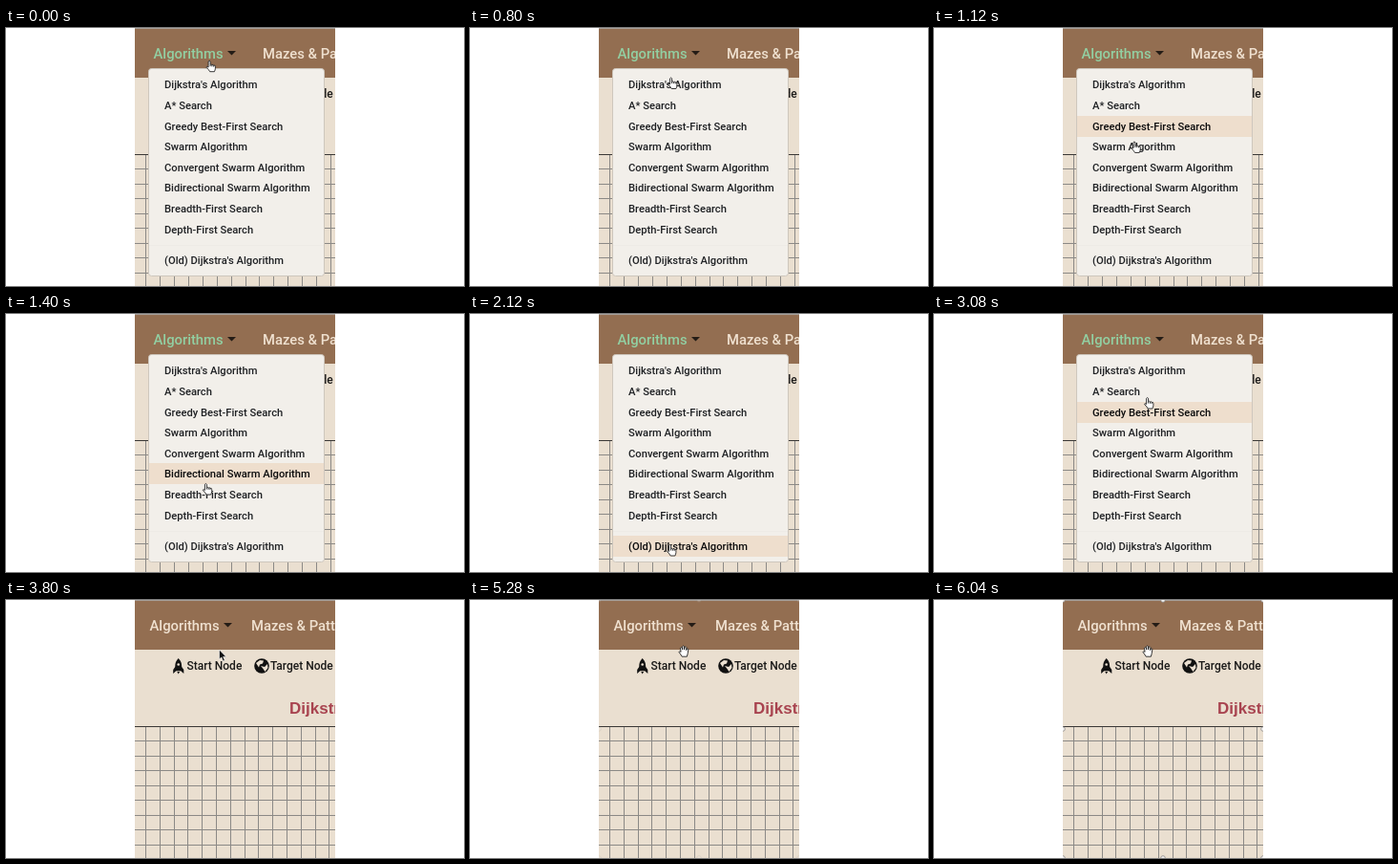
These frames come from a looping animation (480 by 270 pixels, 6.56 s). An HTML page:

```html
<!DOCTYPE html>
<html lang="en">
<head>
<meta charset="utf-8">
<title>Algorithm menu</title>
<style>
  html, body { margin: 0; width: 100%; height: 100%; overflow: hidden; background: #fff; }
  svg { display: block; width: 100vw; height: 100vh; }
  text { font: 500 11.2px Roboto, Lato, sans-serif; fill: #1f2124; }
  .nav text { font-size: 14.8px; fill: #efe0cf; }
  .nav .active { fill: #92cfa2; }
  .label text { font-size: 12px; fill: #1b1a19; }
  .title { font: bold 17px "Liberation Sans", Arial, sans-serif; fill: #a8434f; }
  .hand { fill: #fff; stroke: #222; stroke-width: .9; stroke-linejoin: round; }
</style>
</head>
<body>
<svg viewBox="0 0 480 270">
  <clipPath id="page"><rect x="135" width="210" height="270"/></clipPath>
  <g clip-path="url(#page)">
    <rect x="135" width="210" height="270" fill="#eadfd0"/>
    <rect x="135" width="210" height="52" fill="#936e51"/>
    <rect x="135" width="210" height="1" fill="#a79f97"/>
    <path id="grid" fill="none" stroke="#8b8986"/>
    <path d="M135 132.5H345" stroke="#3a3836"/>

    <g class="nav">
      <text id="algo" y="32">Algorithms</text>
      <path id="caret" d="M0 24h9l-4.5 4.5z" fill="#241c16"/>
      <text id="mazes" y="32">Mazes &amp; Patterns</text>
    </g>

    <g class="label">
      <path d="M180.7 61Q184.4 64.5 184.2 70L186.3 73V77L183.2 74.3H178.2L175.2 77V73L177.2 70Q177 64.5 180.7 61ZM179.3 75h2.8l-1.4 2.5z" fill="#111"/>
      <circle cx="180.7" cy="67.5" r="1.3" fill="#eadfd0"/>
      <text x="189.5" y="73">Start Node</text>
      <circle cx="268" cy="69" r="7.8" fill="#111"/>
      <path d="M262 66l4-3 4 .5-1 3-3 1-1 3zM267 69l4 1 3-3 .5 4-3 4-2-3z" fill="#eadfd0"/>
      <text x="277" y="73">Target Node</text>
    </g>
    <text id="title" class="title" x="297" y="119">Dijkstra's Algorithm</text>

    <g id="menu">
      <rect x="149.5" y="42.5" width="184" height="217" rx="3" fill="#f2efea" stroke="#cec7bd"/>
      <path d="M150 227.5H333" stroke="#eeebe6"/>
      <rect id="hover" x="150" width="183" height="22" fill="#eedecd"/>
    </g>
    <g id="handles" fill="#f4f2f0" stroke="#8d8b89" stroke-width=".8"></g>
  </g>

  <path id="pointer" class="hand" d="M2.6 6V1.3Q3.6 -.3 4.6 1.3V4.6Q5.6 3.8 6.4 5Q7.4 4.2 8.2 5.4Q9.8 4.8 9.9 6.6V8.5Q9.8 10.3 8.9 12H4.2Q3.2 10 .6 7.6Q.4 5.8 2.6 7.4ZM4.6 4.6V6.5M6.4 5V6.7M8.2 5.4V6.9"/>
  <path id="arrow" d="M0 0V10L2.3 8L4 12L5.8 11.2L4.1 7.4H7.2Z" fill="#111" stroke="#fff" stroke-width=".6"/>
  <path id="palm" class="hand" d="M3.6 11.7Q2.5 9.3 .5 7.2Q.6 5.5 2.6 6.8L1.9 2.6Q2.7 1.2 3.6 2.5L4.2 4.5V1Q5.2 -.2 6 1V4.5L6.7 1.6Q7.8 .8 8.4 2.1L8.1 5L8.9 3.5Q10.2 2.9 10.3 4.3Q10.1 7.5 8.9 11.7Z"/>
</svg>
<script>
const LOOP = 6560, STEP = 40;
const CLOSE = 3680, ARROW = 3760, SELECT = 5280, FADE = 160;
const LAG = 50, ROW = 21.6;
const items = ["Dijkstra's Algorithm", "A* Search", "Greedy Best-First Search", "Swarm Algorithm",
  "Convergent Swarm Algorithm", "Bidirectional Swarm Algorithm", "Breadth-First Search",
  "Depth-First Search", "(Old) Dijkstra's Algorithm"];
// time, x, y of the hand
const path = [[680, 209.5, 33.7], [800, 207, 51.5], [1400, 205.8, 177], [1840, 206, 241],
  [2120, 206, 241], [3080, 220, 87], [3400, 219.5, 52]];

const $ = id => document.getElementById(id);
const show = (id, on) => $(id).style.display = on ? "" : "none";
const place = (id, x, y) => $(id).setAttribute("transform", `translate(${x} ${y})`);
const rowTop = i => 48.4 + ROW * i + (i === 8 ? 11.1 : 0);

function add(parent, tag, attrs, text = "") {
  const el = document.createElementNS("http://www.w3.org/2000/svg", tag);
  for (const k in attrs) el.setAttribute(k, attrs[k]);
  el.textContent = text;
  $(parent).append(el);
  return el;
}

const labels = items.map((name, i) => add("menu", "text", { x: 166, y: rowTop(i) + 15 }, name));

function gridLines(x, pitch) {
  let d = "";
  for (let i = 0; i < 14; i++) d += `M${Math.round(x + pitch * i) + .5} 133V270`;
  for (let i = 0; i < 8; i++) d += `M135 ${Math.round(147.4 + 15.45 * i) + .5}H345`;
  return d;
}
const openGrid = gridLines(146.2, 14.9), closedGrid = gridLines(146, 14.8);

for (const cx of [135, 240, 345])
  for (const cy of [0, 135, 270])
    if (cx !== 240 || cy !== 135) add("handles", "circle", { cx, cy, r: 2.3 });

function handAt(t) {
  const n = path.findIndex(p => p[0] > t);
  if (n < 0) return path[path.length - 1].slice(1);
  if (!n) return path[0].slice(1);
  const [a, b] = [path[n - 1], path[n]], k = (t - a[0]) / (b[0] - a[0]);
  return [1, 2].map(j => a[j] + (b[j] - a[j]) * k);
}

function draw(now) {
  const t = Math.floor(now % LOOP / STEP) * STEP;
  const open = t < CLOSE, selecting = t >= SELECT;

  show("menu", open);
  show("title", !open);
  $("grid").setAttribute("d", open ? openGrid : closedGrid);
  $("algo").setAttribute("class", open ? "active" : "");
  $("algo").setAttribute("x", open ? 154.5 : 150.5);
  $("mazes").setAttribute("x", open ? 269 : 257);
  place("caret", open ? 232 : 228, 0);

  const tip = handAt(t - LAG)[1];
  const row = items.findIndex((_, i) => tip >= rowTop(i) && tip < rowTop(i) + ROW);
  show("hover", row >= 0);
  if (row >= 0) $("hover").setAttribute("y", Math.round(rowTop(row)));
  labels.forEach((label, i) => label.style.fill = i === row ? "#0c0c0d" : "");

  show("pointer", t < ARROW);
  show("arrow", t >= ARROW && !selecting);
  show("palm", selecting);
  place("pointer", ...handAt(t));
  place("arrow", 223.5, 52);
  place("palm", 218.5, 47.5);
  $("handles").style.opacity = selecting ? Math.min(1, (t - SELECT + STEP) / (FADE + STEP)) : 0;
}

const start = performance.now();
function tick() {
  draw(performance.now() - start);
  requestAnimationFrame(tick);
}
tick();
</script>
</body>
</html>
```
